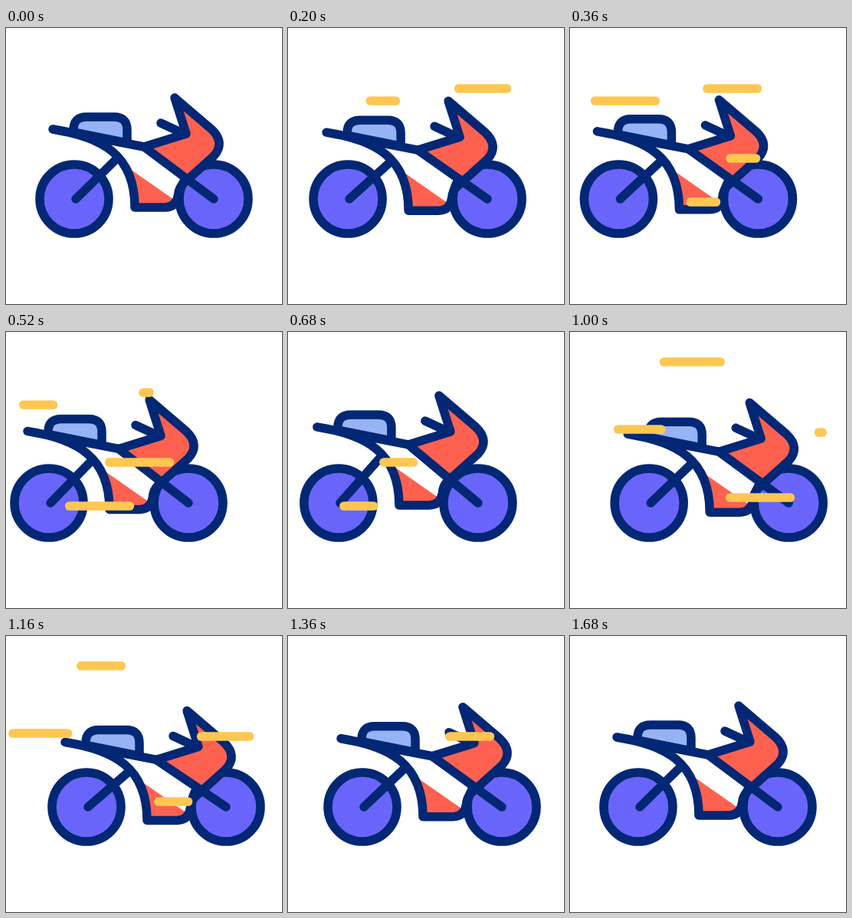
Animation, 360 px wide and 360 px high, one loop 2000 ms. Source, as an HTML page:

```html
<!DOCTYPE html>
<html lang="en">
<head>
<meta charset="utf-8">
<title>Motorbike</title>
<style>
  html, body { margin: 0; width: 100%; height: 100%; overflow: hidden; background: #fff; }
  svg { display: block; width: 100vw; height: 100vh; }
  .line { fill: none; stroke: #022774; stroke-width: 11.5; stroke-linecap: round; stroke-linejoin: round; }
  .wheel { fill: #6a65fa; }
  .red { fill: #ff6150; }
  .seat { fill: #96b3f5; }
  #streaks { fill: none; stroke: #fec751; stroke-width: 11.7; stroke-linecap: round; }
</style>
</head>
<body>
<svg viewBox="0 0 360 360">
  <g id="bike">
    <circle class="line wheel" cx="89" cy="223" r="45"/>
    <circle class="line wheel" cx="271" cy="223" r="45"/>
    <g id="body">
      <path class="red" d="M220 91L268 132C281 144 281 156 271 167L233 204V196L180 156L235 138Z"/>
      <path class="red" d="M159 182L222 226L208 234H168Q168 205 159 182Z"/>
      <path class="line seat" d="M88 136V133Q88 116 105 116H141Q158 116 158 133V150Z"/>
      <path class="line" d="M180 155L61 132C125 142 168 165 168 234H207Q222 234 224.5 218Q225 209 231 203L271 167C281 156 281 144 268 132L220 91L235 138L180 155M202 124L230 137"/>
    </g>
    <path id="struts" class="line"/>
  </g>
  <g id="streaks"></g>
</svg>
<script>
  const LOOP = 2000, STEP = 40;
  const LIFE = 540, TRAVEL = 118;   // of every streak: ms and px
  const $ = id => document.getElementById(id);
  const smooth = p => p * p * (3 - 2 * p);
  const span = (t, a, b) => Math.min(1, Math.max(0, (t - a) / (b - a)));

  // Eased moves: each one ends at `end` with the value `to`
  const move = (...stops) => t => {
    let start = 0, value = 0, from = 0;
    for (const { end, to } of stops) {
      value += (to - from) * smooth(span(t, start, end));
      start = end;
      from = to;
    }
    return value;
  };

  const sway = move({ end: 520, to: -33 }, { end: 1080, to: 17 }, { end: 1620, to: 0 });
  const bounce = move({ end: 240, to: 4.5 }, { end: 810, to: -10 }, { end: 1120, to: 6.7 }, { end: 1480, to: 0 });

  // The head runs ahead, the tail starts late and speeds up to catch it
  function streak(start, y, x) {
    const path = document.createElementNS("http://www.w3.org/2000/svg", "path");
    $("streaks").append(path);
    return t => {
      const p = (t - start) / LIFE;
      const head = smooth(span(p, 0, 0.63));
      const tail = span(p, 0.2, 1) ** 1.5;
      path.setAttribute("d", head > tail ? `M${x - TRAVEL * head} ${y}H${x - TRAVEL * tail}` : "");
    };
  }

  const streaks = [
    streak(0, 79, 297),
    streak(80, 95, 141),
    streak(240, 170, 243),
    streak(240, 227, 191),
    streak(720, 216, 317),
    streak(760, 39, 216),
    streak(820, 127, 127),
    streak(960, 131, 329)
  ];

  function draw() {
    const t = Math.floor(performance.now() % LOOP / STEP) * STEP;
    const dy = bounce(t);
    $("bike").setAttribute("transform", `translate(${sway(t)} 0)`);
    $("body").setAttribute("transform", `translate(0 ${dy})`);
    $("struts").setAttribute("d", `M146 ${169 + dy}L91 223M180 ${155 + dy}L271 223`);
    streaks.forEach(update => update(t));
    requestAnimationFrame(draw);
  }
  draw();
</script>
</body>
</html>
```
